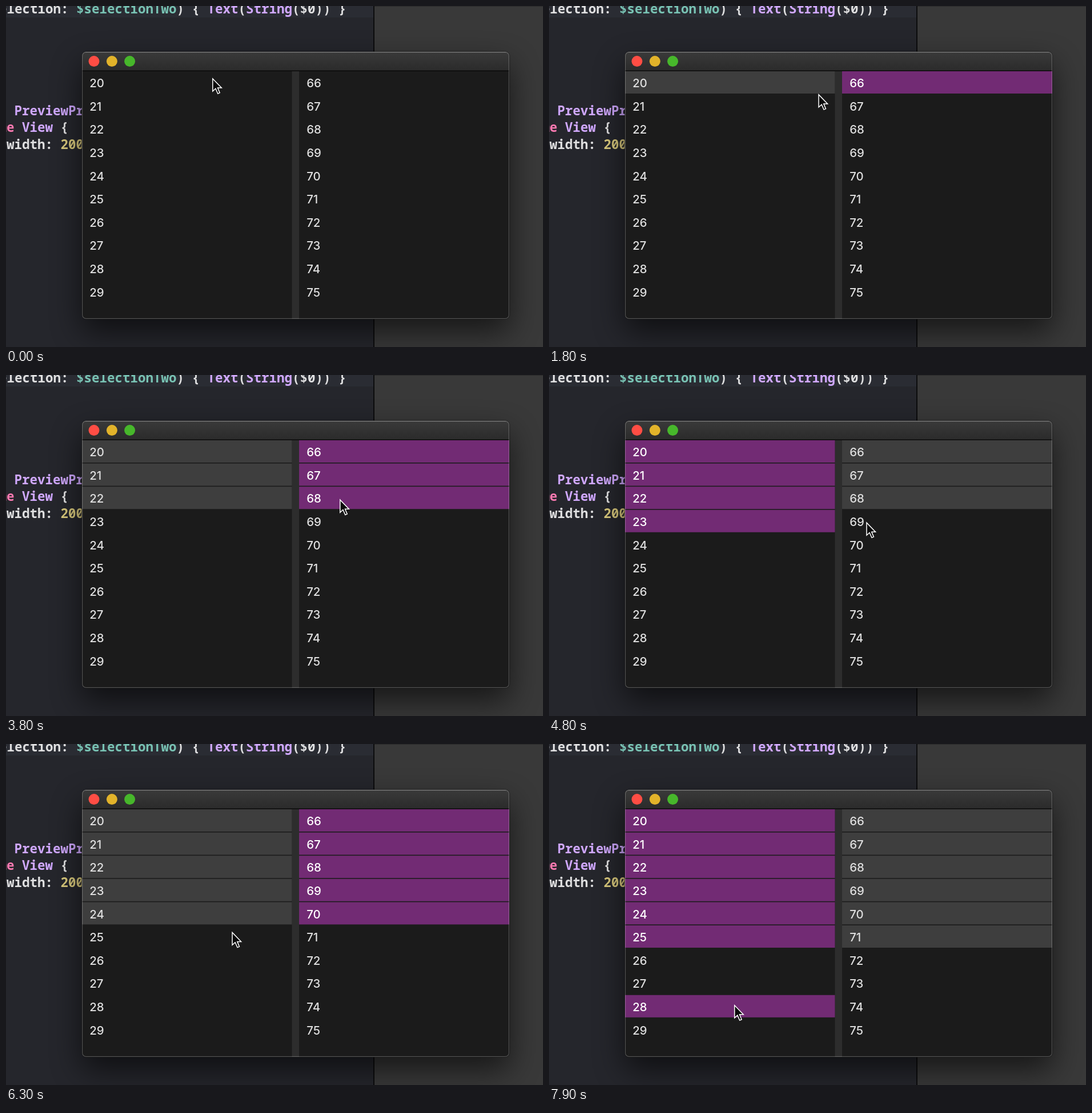
These frames come from a looping animation (940x596 px, 8 s). An HTML page:

```html
<!DOCTYPE html>
<html lang="en">
<head>
<meta charset="utf-8">
<title>Linked list selection</title>
<style>
  html, body { margin: 0; width: 100%; height: 100%; overflow: hidden; background: #25262c; }
  svg { display: block; width: 940px; height: 596px; }
  .code { font: 600 22.5px "Noto Sans Mono", monospace; fill: #dfdfe0; white-space: pre; }
  .type { fill: #d0a8ff; }
  .keyword { fill: #ff7ab2; font-weight: 700; }
  .member { fill: #78c2b3; }
  .number { fill: #d9c97c; }
  .label { font: 500 20.4px Inter, sans-serif; }
</style>
</head>
<body>
<svg viewBox="0 0 940 596" xmlns="http://www.w3.org/2000/svg">
  <defs>
    <linearGradient id="titlebar" x2="0" y2="1">
      <stop stop-color="#3a3a3a"/>
      <stop offset="1" stop-color="#2b2b2b"/>
    </linearGradient>
    <filter id="blur" x="-30%" y="-40%" width="160%" height="180%">
      <feGaussianBlur stdDeviation="27"/>
    </filter>
    <clipPath id="frame"><rect x="133" y="80" width="748" height="467" rx="7"/></clipPath>
  </defs>

  <rect width="643" height="596" fill="#25262c"/>
  <rect width="643" height="20" fill="#2a2c33"/>
  <rect x="645" width="295" height="596" fill="#393939"/>
  <rect x="645" width="295" height="1" fill="#2a2a2a"/>
  <rect x="643" width="2" height="596" fill="#0c0c0d"/>

  <g class="code">
    <text x="-12" y="13">election: <tspan class="member">$selectionTwo</tspan>) { <tspan class="type">Text</tspan>(<tspan class="type">String</tspan>($0)) }</text>
    <text x="14.5" y="190.5" class="type">PreviewProvider</text>
    <text x="-12.5" y="220"><tspan class="keyword">me</tspan> <tspan class="type">View</tspan> {</text>
    <text x="1" y="249.7">width: <tspan class="number">200</tspan></text>
  </g>

  <rect x="133" y="102" width="748" height="467" rx="7" opacity=".6" filter="url(#blur)"/>
  <rect x="132.5" y="79.5" width="749" height="468" rx="7.5" fill="#0b0b0b"/>
  <g clip-path="url(#frame)">
    <rect x="133" y="80" width="748" height="467" fill="#1b1b1b"/>
    <rect x="133" y="80" width="748" height="33" fill="url(#titlebar)"/>
    <rect x="133" y="112.7" width="748" height="1.3" fill="#060606"/>
    <circle cx="154" cy="96.6" r="9.5" fill="#ff4d44"/>
    <circle cx="185.4" cy="96.6" r="9.5" fill="#e2b32a"/>
    <circle cx="216.6" cy="96.6" r="9.5" fill="#47b72b"/>
    <rect x="500.5" y="114" width="12.5" height="433" fill="#2d2d2d"/>
    <g id="lists"></g>
  </g>
  <rect x="133.6" y="80.6" width="746.8" height="465.8" rx="6.5" fill="none" stroke="#fff" stroke-opacity=".24" stroke-width="1.2"/>
  <path d="M139 80.6H875" stroke="#fff" stroke-opacity=".16" stroke-width="1.2"/>

  <path id="pointer" d="M.8 1V23L5.9 18.3 9.8 27.2 13.2 25.7 9.5 17H16.3Z" fill="#0a0a0a" stroke="#fff" stroke-width="1.5"/>
</svg>

<script>
const LOOP = 8000, STEP = 100, ROWS = 10, TOP = 114, PITCH = 40.6;
const lists = [
  { x: 133, width: 367.5, first: 20, clickX: 360, clickY: 17 },
  { x: 513, width: 368, first: 66, clickX: 584, clickY: 22 }
];

const svgNode = (parent, name, attrs) => {
  const node = document.createElementNS("http://www.w3.org/2000/svg", name);
  for (const key in attrs) node.setAttribute(key, attrs[key]);
  return parent.appendChild(node);
};

const listsNode = document.getElementById("lists");
const pointer = document.getElementById("pointer");

for (const list of lists) {
  list.rows = Array.from({ length: ROWS }, (_, i) => {
    const y = TOP + i * PITCH;
    const bar = svgNode(listsNode, "rect", { x: list.x, y, width: list.width, height: 39 });
    const label = svgNode(listsNode, "text", { x: list.x + 13.2, y: y + 28.1, class: "label" });
    label.textContent = list.first + i;
    return { bar, label };
  });
}

// Clicks alternate between the lists at a quickening pace, one row down each round.
function makeClick(k, row = k >> 1, x = lists[k % 2].clickX) {
  const side = k % 2;
  return { time: 500 + 720 * k - 12 * k * k, side, row, x, y: TOP + row * PITCH + lists[side].clickY };
}
const clicks = Array.from({ length: 12 }, (_, k) => makeClick(k));
clicks.push(makeClick(12, 8, 324));

const stops = [{ time: 0, x: 361, y: 126 }, ...clicks];

// The pointer rests after a click, then leaves sooner on each later leg.
function pointerAt(t) {
  const next = stops.findIndex(stop => stop.time > t);
  if (next < 0) return stops[stops.length - 1];
  const from = stops[next - 1], to = stops[next];
  const part = (t - from.time) / (to.time - from.time);
  const u = Math.max(0, (part - .15) / .85) ** (4 / Math.max(1, next - 2));
  const ease = u * u * (3 - 2 * u);
  return { x: from.x + (to.x - from.x) * ease, y: from.y + (to.y - from.y) * ease };
}

function render(time) {
  const t = Math.floor(time % LOOP / STEP) * STEP;
  const done = clicks.filter(click => click.time <= t);
  const focus = done.length ? done[done.length - 1].side : -1;
  lists.forEach(({ rows }, side) => rows.forEach(({ bar, label }, row) => {
    const selected = done.some(click => click.side === side && click.row === row);
    const active = selected && side === focus;
    bar.setAttribute("fill", active ? "#722b74" : selected ? "#3e3e3e" : "none");
    label.setAttribute("fill", active ? "#fff" : "#dfdfdf");
  }));
  const { x, y } = pointerAt(t);
  pointer.setAttribute("transform", `translate(${x} ${y})`);
}

const start = performance.now();
function tick() {
  render(performance.now() - start);
  requestAnimationFrame(tick);
}
tick();
</script>
</body>
</html>
```
